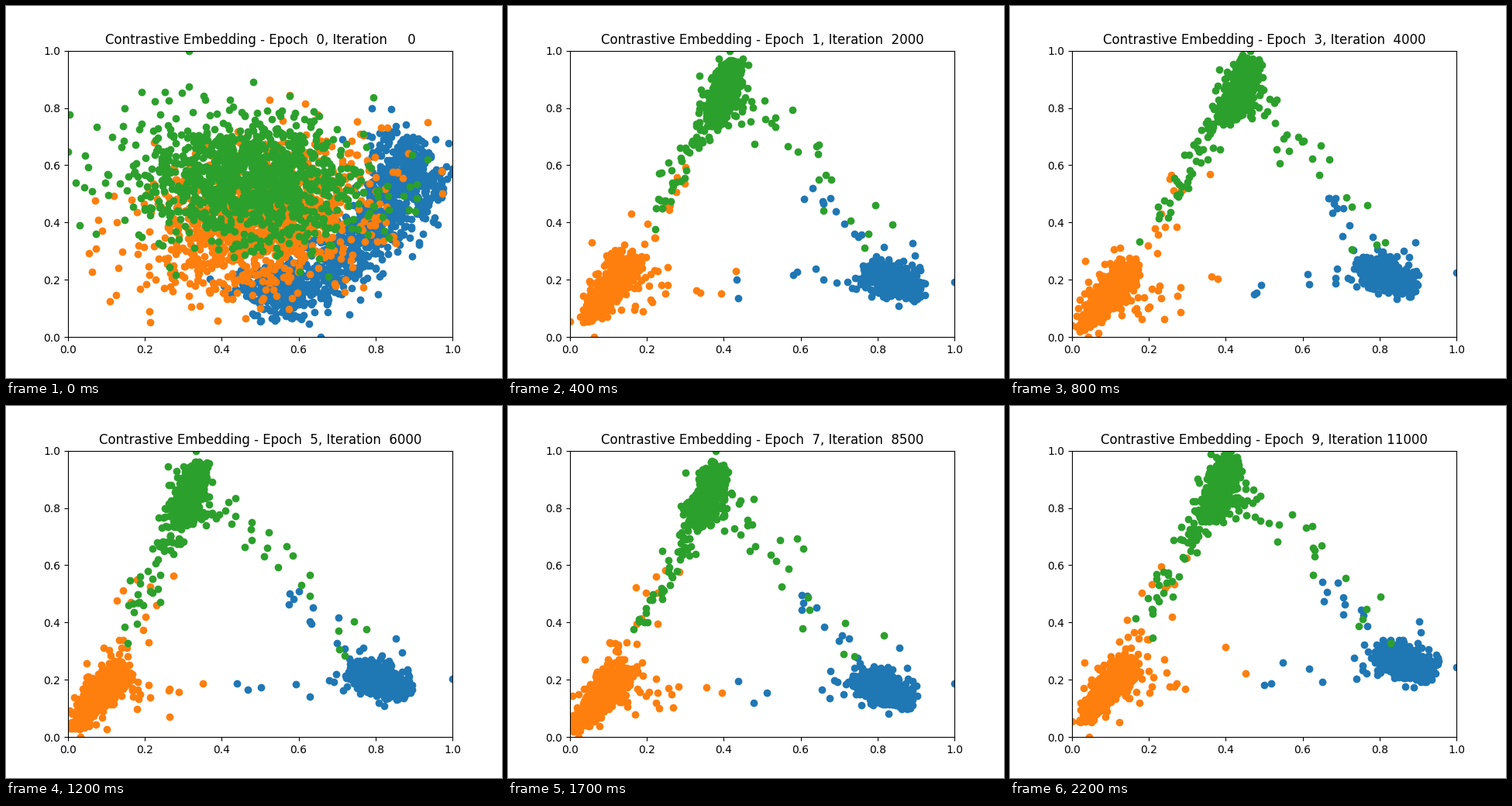
A matplotlib script for the animation above (5200 ms loop, 640 by 480 pixels).

```python
import numpy as np
import matplotlib.pyplot as plt
from matplotlib.animation import FuncAnimation

LAST, FRAMES, STEP = 22, 52, 100
ITERS, EPOCH = 500, 1129
N = 1000

BLUE, ORANGE, GREEN = COLORS = ["tab:blue", "tab:orange", "tab:green"]

# Where the trained clusters are centred as the embedding drifts.
TIMES = [4, 8, 12, 15, 17, 22]
CENTRES = {
    BLUE: ([.84, .82, .81, .77, .815, .865], [.195, .21, .20, .205, .165, .26]),
    ORANGE: ([.105, .09, .078, .09, .08, .092], [.17, .14, .14, .215, .14, .165]),
    GREEN: ([.398, .435, .315, .32, .358, .385], [.855, .865, .85, .845, .845, .87]),
}

# Tilt in degrees, long and short spread, widening along the long axis.
SHAPES = {
    BLUE: (-35, .044, .018, 0),
    ORANGE: (59, .066, .0145, .2),
    GREEN: (75, .060, .0135, 0),
}

# Untrained clouds: centre, tilt, long and short spread.
STARTS = {
    BLUE: ((.73, .36), 52, .23, .055),
    ORANGE: ((.50, .42), 35, .165, .12),
    GREEN: ((.47, .55), -10, .15, .115),
}

# Confused samples strung out towards another class:
# count, nearest and farthest share of the way, looseness, arch.
TAILS = {
    BLUE: [(GREEN, 20, .08, .45, .025, 0), (ORANGE, 12, .10, .5, .03, 0)],
    ORANGE: [(GREEN, 26, .12, .65, .03, 0), (BLUE, 18, .08, .5, .04, 0)],
    GREEN: [(ORANGE, 55, .12, .68, .018, 0), (BLUE, 30, .08, .9, .035, .09)],
}


def centre(name, k):
    return np.array([np.interp(k, TIMES, c) for c in CENTRES[name]])


def place(mid, tilt, p, q):
    c, s = np.cos(np.radians(tilt)), np.sin(np.radians(tilt))
    return mid + np.column_stack([c * p - s * q, s * p + c * q])


def trained(name, k, fixed, fresh):
    """Compact core plus the tails reaching for the other classes."""
    here = centre(name, k)
    tilt, long, short, widen = SHAPES[name]
    # Every sample keeps most of its place and wavers a little each step.
    a = .9 * fixed.normal(size=N) + .43 * fresh.normal(size=N)
    b = .9 * fixed.standard_t(6, N) + .43 * fresh.normal(size=N)
    a = 2.4 * np.tanh(a / 2.4)
    parts = [place(here, tilt, long * a, short * b * (1 + widen * a))]
    for other, count, near, far, loose, arch in TAILS[name]:
        t = near + (far - near) * fixed.random(count) ** 2
        t = t[:, None] + fresh.normal(0, .02, (count, 1))
        line = here + t * (centre(other, k) - here)
        line[:, 1:] += arch * np.sin(np.pi * t)
        parts.append(line + fresh.normal(0, loose, (count, 2)))
    return np.vstack(parts)


def untrained(name, count, rng):
    mid, tilt, long, short = STARTS[name]
    a, b = rng.normal(size=(2, count))
    if name == BLUE:
        # A bent band, thicker at both ends.
        a = 1.35 * np.tanh(1.2 * a) + rng.normal(0, .2, count)
        return place(mid, tilt, long * a, short * b + .04 * (a ** 2 - 1))
    return place(mid, tilt, long * a, short * b)


def cloud(name, k):
    seed = COLORS.index(name)
    pts = trained(name, k, np.random.default_rng(40 + seed),
                  np.random.default_rng([seed, k]))
    # Training separates the classes almost at once, then they only drift.
    left = max(0, 1 - k / TIMES[0]) ** 5
    if left:
        start = untrained(name, len(pts), np.random.default_rng(70 + seed))
        pts = left * start + (1 - left) * pts
    return np.clip(pts, .004, .996)


def embedding(k):
    """All three clouds, with the outermost samples touching the frame."""
    clouds = [cloud(name, k) for name in COLORS]
    pts = np.vstack(clouds)
    for axis in (0, 1):
        pts[pts[:, axis].argmin(), axis] = 0
        pts[pts[:, axis].argmax(), axis] = 1
    return np.split(pts, np.cumsum([len(c) for c in clouds])[:-1])


fig, ax = plt.subplots(figsize=(6.4, 4.8), dpi=100)
ax.set_xlim(0, 1)
ax.set_ylim(0, 1)
title = ax.set_title("")
dots = [ax.scatter([], [], color=name) for name in COLORS]


def draw(frame):
    k = min(frame, LAST)
    step = k * ITERS
    title.set_text(f"Contrastive Embedding - Epoch {step // EPOCH:2d}, "
                   f"Iteration {step:5d}")
    for dot, pts in zip(dots, embedding(k)):
        dot.set_offsets(pts)
    return [title, *dots]


anim = FuncAnimation(fig, draw, frames=FRAMES, interval=STEP,
                     init_func=lambda: draw(0), repeat=True, repeat_delay=0)
plt.show()
```
